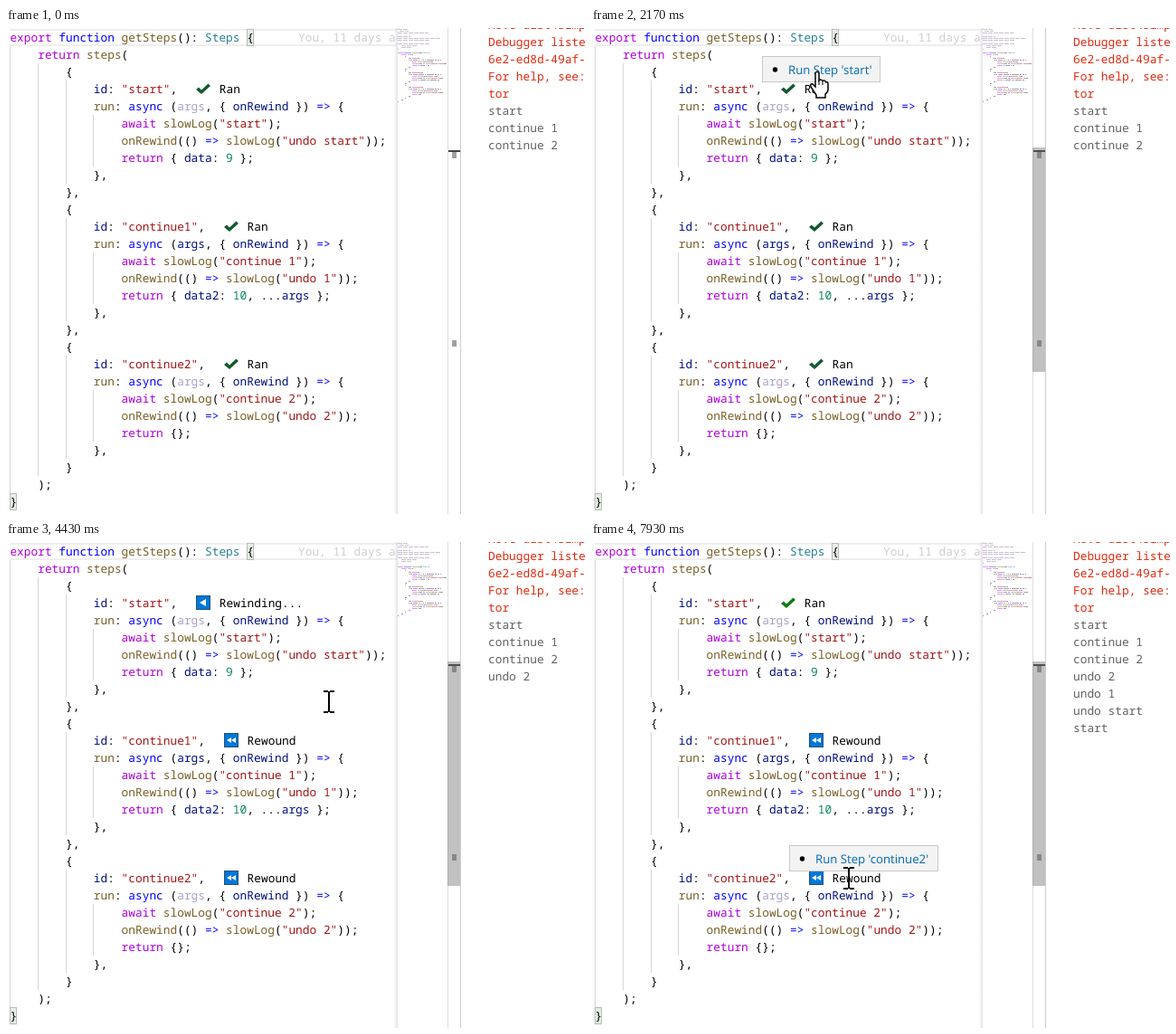
These frames come from a looping animation (640 by 537 pixels, 8000 ms). An HTML page with a canvas:

```html
<!DOCTYPE html>
<html lang="en">
<meta charset="utf-8">
<style>
  html, body { margin: 0; width: 100%; height: 100%; overflow: hidden; background: #fff; }
  canvas { display: block; }
</style>
<canvas id="stage" width="640" height="537"></canvas>
<script>
const ctx = document.getElementById('stage').getContext('2d');
const LOOP = 8000, CHAR = 7.7, LINE = 19, LEFT = 4.4;
const MONO = '12.83px "Noto Sans Mono", monospace';
const SANS = '13.2px "Open Sans", sans-serif';

const step = (id, log, undo, result, close = '},') => [
  '        {',
  `            id: "${id}",`,
  '            run: async (args, { onRewind }) => {',
  `                await slowLog("${log}");`,
  `                onRewind(() => slowLog("${undo}"));`,
  `                return ${result};`,
  '            },',
  '        ' + close];
const code = [
  'export function getSteps(): Steps {',
  '    return steps(',
  ...step('start', 'start', 'undo start', '{ data: 9 }'),
  ...step('continue1', 'continue 1', 'undo 1', '{ data2: 10, ...args }'),
  ...step('continue2', 'continue 2', 'undo 2', '{}', '}'),
  '    );',
  '}'];

const UNUSED = '#a8a3c8';
const colours = [
  [/^"/, '#a31515'],
  [/^(export|return|await)\b/, '#af00db'],
  [/^(function\b|async\b|=>)/, '#0000ff'],
  [/^\d/, '#098658'],
  [/^(getSteps\b|steps\b|slowLog\b|run\b|onRewind\()/, '#795e26'],
  [/^Steps\b/, '#267f99'],
  [/^\w/, '#001080'],
  [/./, '#000000']];

const tokens = code.flatMap((line, row) =>
  [...line.matchAll(/"[^"]*"|\w+|=>|[^\s\w"=]+/g)].map(({ 0: text, index: col }) => {
    const unused = text === 'args' && (row === 4 || row === 20);
    const colour = colours.find(([start]) => start.test(line.slice(col)))[1];
    return { text, row, col, colour: unused ? UNUSED : colour };
  }));

// Status changes per step: [time, label]
const statuses = [
  { row: 3, changes: [[0, 'Ran'], [4430, 'Rewinding...'], [5360, 'Rewound'], [5450, 'Running...'], [6370, 'Ran']] },
  { row: 11, changes: [[0, 'Ran'], [3420, 'Rewinding...'], [4430, 'Rewound']] },
  { row: 19, changes: [[0, 'Ran'], [2400, 'Rewinding...'], [3420, 'Rewound']] }];

const ERROR = '#e02a10', OUTPUT = '#616161';
const output = [
  [0, 'Move dist\\simp', ERROR], [0, 'Debugger listening', ERROR], [0, '6e2-ed8d-49af-', ERROR],
  [0, 'For help, see: ', ERROR], [0, 'tor', ERROR],
  [0, 'start'], [0, 'continue 1'], [0, 'continue 2'],
  [3570, 'undo 2'], [4580, 'undo 1'], [5530, 'undo start'], [6540, 'start']];

// Pointer path: time, x, y
const path = [
  [360, 638, 524], [520, 560, 360], [680, 440, 190], [840, 320, 75], [980, 268, 40], [1150, 253, 69],
  [1230, 250, 69], [1700, 250, 69], [1780, 247, 70], [1860, 255, 71], [1940, 261, 67], [2020, 259, 64],
  [2100, 259, 64], [2170, 250, 48], [2400, 251, 46], [2560, 258, 42], [2720, 298, 78], [2960, 350, 160],
  [3040, 357, 176], [7070, 357, 176], [7150, 358, 202], [7230, 352, 250], [7390, 305, 345], [7550, 285, 371]];

const clamp = v => Math.min(1, Math.max(0, v));

function rect(x, y, w, h, colour) {
  ctx.fillStyle = colour;
  ctx.fillRect(x, y, w, h);
}

function text(string, x, y, colour, font = MONO) {
  ctx.font = font;
  ctx.fillStyle = colour;
  ctx.fillText(string, x, y);
}

function shape(points, fill, stroke) {
  ctx.beginPath();
  for (let i = 0; i < points.length; i += 2) ctx.lineTo(points[i], points[i + 1]);
  ctx.closePath();
  ctx.fillStyle = fill;
  ctx.fill();
  if (stroke) {
    ctx.strokeStyle = stroke;
    ctx.lineWidth = 1;
    ctx.stroke();
  }
}

function at(x, y, draw) {
  ctx.save();
  ctx.translate(x, y);
  draw();
  ctx.restore();
}

function bracketBox(x, row) {
  rect(x, 1 + row * LINE, 8, LINE, '#b9b9b9');
  rect(x + 1, 2 + row * LINE, 6, LINE - 2, '#e5f0e5');
}

function guides() {
  code.forEach((line, row) => {
    const indent = line.search(/\S/);
    for (let col = 0; col < indent; col += 4)
      rect(Math.floor(LEFT + col * CHAR), 1 + row * LINE, 1, LINE, '#d6d6d6');
  });
}

function editor() {
  rect(4, 1, 428, 2, '#eeeeee');
  rect(4, 18, 428, 2, '#eeeeee');
  guides();
  bracketBox(266, 0);
  bracketBox(4, 27);
  for (const { text: string, row, col, colour } of tokens)
    text(string, LEFT + col * CHAR, 15 + row * LINE, colour);
  text('You, 11 days ago', 323, 15, '#cfcfcf');
}

function minimap() {
  rect(432, 0, 56, 537, '#ffffff');
  const shade = ctx.createLinearGradient(433, 0, 429, 0);
  shade.addColorStop(0, 'rgba(200,200,200,.5)');
  shade.addColorStop(1, 'rgba(200,200,200,0)');
  rect(429, 0, 4, 537, shade);
  // Row, indent and length of the lines scrolled out above
  ctx.globalAlpha = .3;
  for (const [y, x, width] of [[1, 0, 12], [3, 2, 10], [5, 0, 34], [9, 0, 14], [11, 0, 48], [13, 0, 36], [17, 0, 35], [19, 4, 17], [21, 4, 12], [23, 0, 1]])
    for (let i = 0; i < width; i++)
      if (i % 6 < 5) rect(433 + x + i, y, 1, 1, i % 11 < 6 ? '#5a2080' : '#404040');
  ctx.globalAlpha = .4;
  for (const { text: string, row, col, colour } of tokens)
    [...string].forEach((c, i) => c !== ' ' && rect(433 + col + i, 27 + row * 2, 1, 1, colour));
  ctx.globalAlpha = 1;
}

function ruler(t) {
  rect(488, 0, 1, 537, '#dddddd');
  rect(502, 0, 1, 537, '#cccccc');
  rect(493, 137, 5, 7, '#a0a0a0');
  rect(493, 345, 5, 7, '#a0a0a0');
  rect(489, 135, 13, 2, '#424248');
  rect(488, 132, 14, 248, `rgba(100,100,100,${.4 * clamp((t - 620) / 120)})`);
}

function icon(label, rerun) {
  if (label === 'Ran') {
    shape([0, 7, 3, 4.5, 6, 7.5, 13.5, .5, 16, 3, 6, 12], rerun ? '#107c10' : '#125a30');
    return;
  }
  rect(0, -2, 16, 16, '#24507f');
  rect(1, -1, 14, 14, '#0078d7');
  if (label === 'Rewinding...') shape([4, 6, 11, 2, 11, 10], '#ffffff');
  else if (label === 'Running...') shape([12, 6, 5, 2, 5, 10], '#ffffff');
  else for (const x of [3, 8]) shape([x, 6, x + 5, 3, x + 5, 9], '#ffffff');
}

function status({ row, changes }, t) {
  const [since, label] = changes.findLast(([start]) => t >= start);
  const end = LEFT + code[row].length * CHAR;
  at(Math.round(end + 20.6), 4 + row * LINE, () => icon(label, since > 0));
  text(label, end + (label === 'Running...' ? 43.6 : 46.6), 15 + row * LINE, '#000000');
}

function terminal(t) {
  output.forEach(([start, string, colour = OUTPUT], i) => {
    if (t >= start) text(string, 533, 1 + i * LINE, colour);
  });
}

function tooltip(x, y, width, label, alpha) {
  ctx.globalAlpha = alpha;
  rect(x, y, width, 29, '#c8c8c8');
  rect(x + 1, y + 1, width - 2, 27, '#f3f3f3');
  ctx.beginPath();
  ctx.arc(x + 14.5, y + 15, 2.7, 0, 7);
  ctx.fillStyle = '#000000';
  ctx.fill();
  text(label, x + 29, y + 20, '#006ab1', SANS);
  ctx.globalAlpha = 1;
}

function textCursor() {
  rect(-1, -11, 2, 23, '#000000');
  for (const y of [-12, 11]) {
    rect(-6, y, 5, 2, '#000000');
    rect(1, y, 5, 2, '#000000');
  }
}

function hand() {
  const outline = new Path2D('M-2 1.5Q0-1 2 1.5V10Q4 8 6 10.5Q8 9 10 12Q12 11 12 14V20Q12 23 9 25V29H-1V26L-7 17Q-8 13-5 14L-2 17Z');
  ctx.fillStyle = '#ffffff';
  ctx.fill(outline);
  ctx.strokeStyle = '#000000';
  ctx.lineWidth = 1.5;
  ctx.stroke(outline);
  for (const x of [2, 6]) rect(x - .5, 10, 1, 5, '#000000');
}

function arrow() {
  shape([0, 0, 0, 17, 4, 13.5, 7, 20, 10, 19, 7, 12.5, 12, 12], '#ffffff', '#000000');
}

function pointer(t) {
  if (t < path[0][0]) return;
  const from = path.findLast(([time]) => t >= time);
  const to = path[path.indexOf(from) + 1] || from;
  const k = clamp((t - from[0]) / (to[0] - from[0] || 1));
  const x = from[1] + (to[1] - from[1]) * k, y = from[2] + (to[2] - from[2]) * k;
  const overLink = t > 2100 && t < 2640 && y < 60;
  at(Math.round(x), Math.round(y), overLink ? hand : x > 432 && x < 503 ? arrow : textCursor);
}

function draw(t) {
  ctx.textRendering = 'geometricPrecision';
  rect(0, 0, 640, 537, '#ffffff');
  editor();
  statuses.forEach(s => status(s, t));
  minimap();
  ruler(t);
  terminal(t);
  if (t >= 1530 && t < 2640) tooltip(189, 31, 131, "Run Step 'start'", clamp((t - 1490) / 110));
  if (t >= 7930) tooltip(219, 335, 165, "Run Step 'continue2'", 1);
  pointer(t);
}

const begin = performance.now();
(function frame() {
  draw((performance.now() - begin) % LOOP);
  requestAnimationFrame(frame);
})();
</script>
</html>
```
